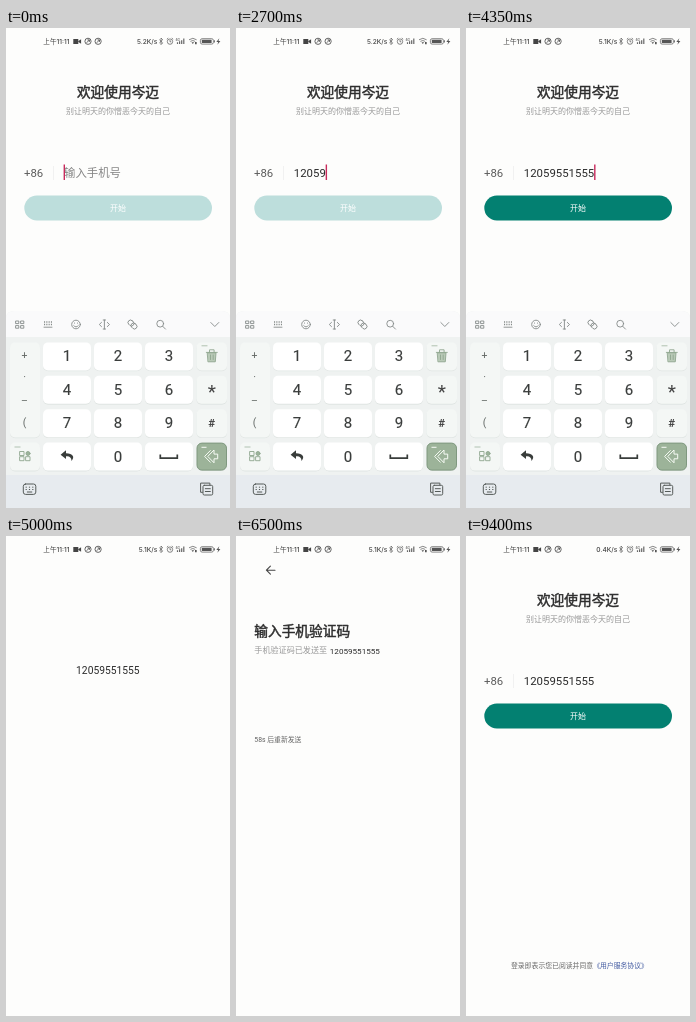
These frames come from a looping animation (224x480 px, 9.45 s). An HTML page:

```html
<!DOCTYPE html>
<html lang="zh-CN">
<head>
<meta charset="utf-8">
<title>登录</title>
<style>
  html, body { margin: 0; width: 100%; height: 100%; overflow: hidden; background: #fdfdfc; }
  svg { display: block; width: 100vw; height: 100vh; }
  text { font-family: Roboto, "Noto Sans CJK SC", "Noto Sans CJK", sans-serif; white-space: pre; }
  .mid { text-anchor: middle; }
  .status text { font: 500 6.6px Inter, "Noto Sans CJK SC", "Noto Sans CJK", sans-serif; fill: #444; }
  .head { font-size: 13.7px; fill: #2c2c2c; stroke: #2c2c2c; stroke-width: .45; }
  .note { font-size: 8px; fill: #999; }
  .small { font-size: 6.85px; fill: #666; }
  .field { font-size: 11.4px; }
  .digit { font-size: 15px; fill: #3a3d3c; stroke: #3a3d3c; stroke-width: .15; }
  .star { font-size: 19px; fill: #444; }
  .hash { font-size: 11.5px; font-weight: 700; fill: #444; }
  .sym { font-size: 10.5px; fill: #666c69; }
  .line { fill: none; stroke: #858b89; stroke-width: .9; stroke-linecap: round; stroke-linejoin: round; }
  .bar { stroke: #555b59; stroke-width: 1; }
  .green { stroke: #8fa68f; }
</style>
</head>
<body>
<svg viewBox="0 0 224 480">
  <rect width="224" height="480" fill="#fdfdfc"/>

  <g id="login">
    <text class="head mid" x="112" y="68.6">欢迎使用岑迈</text>
    <text class="note mid" x="112" y="86">别让明天的你憎恶今天的自己</text>
    <text class="field" x="18" y="149" fill="#5c5c5c">+86</text>
    <path d="M47.5 138v14" stroke="#eee" stroke-width=".8"/>
    <text id="hint" class="field" x="58" y="149.2" fill="#858585">输入手机号</text>
    <rect id="button" x="18.3" y="167.5" width="187.7" height="25" rx="12.5"/>
    <text class="mid" x="112" y="183.1" font-size="8" fill="#fff">开始</text>
    <text class="small" x="45" y="432">登录即表示您已阅读并同意<tspan fill="#4059a0">《用户服务协议》</tspan></text>
  </g>

  <g id="verify">
    <path class="line" style="stroke:#444;stroke-width:1.1" d="M39 34.2H30.6M34.4 30.2L30.4 34.2L34.4 38.2"/>
    <text class="head" x="18.3" y="100.2">输入手机验证码</text>
    <text class="note" x="18.3" y="117.4" style="font-size:8.1px">手机验证码已发送至</text>
    <text id="wait" class="small" x="18.3" y="206"></text>
  </g>

  <g id="number"><text id="digits" class="field" fill="#2a2a2a"></text></g>
  <rect id="caret" y="136.5" width="1.4" height="15.5" fill="#c92a5c"/>

  <g class="status">
    <text x="37.3" y="15.8">上午11:11</text>
    <path d="M67.3 11h5v5h-5zM72.5 13l2.6-1.7v4.4l-2.6-1.7z" fill="#444"/>
    <g fill="none" stroke="#555" stroke-width=".9">
      <circle cx="82" cy="13.3" r="3.1"/><path d="M80.6 14.8l2.8-2.9M81.4 11.9h2v2"/>
      <circle cx="92.1" cy="13.3" r="3.1"/><path d="M90.7 14.8l2.8-2.9M91.5 11.9h2v2"/>
      <g stroke-width=".7">
        <path d="M153.3 11.6l3.4 3.3l-1.7 1.7v-6.6l1.7 1.7l-3.4 3.3"/>
        <circle cx="164" cy="13.6" r="2.7"/><path d="M164 12v1.8h1.3M160.8 11.3l1.4-1.3M167.2 11.3l-1.4-1.3"/>
        <path d="M183 11.8q3.9-3 7.6 0M184.4 13.4q2.4-1.8 4.8 0"/>
        <rect x="194.4" y="10.7" width="13" height="5.4" rx="1.7"/>
      </g>
    </g>
    <path d="M185.5 14.2h2.6l-1.3 1.7zM189 14h1.7v2.2H189zM195.8 11.8h9.8v3.2h-9.8zM208 12.3h.8v2.2H208zM213.3 10.2l-3 3.7h1.9l-.8 2.8l3-3.8h-1.9z" fill="#555"/>
    <path d="M171.5 16v-1.7M173.6 16v-2.7M175.7 16v-3.7M177.8 16v-5.5" stroke="#666" stroke-width="1.2"/>
    <text x="169.4" y="12.6" style="font-size:3.2px">4G</text>
    <text id="speed" x="151.3" y="15.8" text-anchor="end"></text>
  </g>

  <g id="keyboard">
    <path d="M0 480V291q0-8 8-8h208q8 0 8 8v189z" fill="#eff2f1"/>
    <path d="M0 309V291q0-8 8-8h208q8 0 8 8v18z" fill="#fafafb"/>
    <path d="M0 447h224v33H0z" fill="#e7ebef"/>
    <g class="line">
      <path d="M10 293h2.8v2.6H10zM15 293h2.8v2.6H15zM10 297.6h2.8v2.6H10zM15 297.6h2.8v2.6H15z"/>
      <path d="M38 294h8M38 296.5h8" stroke-dasharray="1.1 1.2" stroke-linecap="butt" stroke-width="1.4"/>
      <path d="M38 299.2h8"/>
      <circle cx="70" cy="296.5" r="4.3"/>
      <path d="M67.7 297.6q2.3 2.8 4.6 0M68.5 295v.2M71.5 295v.2"/>
      <path d="M98.4 292v9M97.2 292h2.4M97.2 301h2.4M95.5 294.4l-2.2 2.1l2.2 2.1M101.3 294.4l2.2 2.1l-2.2 2.1"/>
      <g transform="rotate(45 126.5 296.5)">
        <rect x="121.2" y="294" width="6.4" height="5" rx="2.5"/>
        <rect x="125.4" y="294" width="6.4" height="5" rx="2.5"/>
      </g>
      <circle cx="154.2" cy="295.7" r="3.4"/><path d="M156.7 298.3l2.8 2.8"/>
      <path d="M204.8 294.5l4 4l4-4"/>
    </g>
    <g class="line bar">
      <rect x="17.3" y="456" width="12.5" height="10.4" rx="2.3"/>
      <path d="M20 459.2h.4M23.3 459.2h.4M26.6 459.2h.4M20 461.5h.4M23.3 461.5h.4M26.6 461.5h.4M21.3 464h4.5"/>
      <path d="M196.5 464.3h-1.9v-9.2h9.3v1.8"/>
      <rect x="197" y="457.3" width="9.7" height="9.7" rx="1.3"/><path d="M199.3 460.7h5M199.3 463.5h5"/>
    </g>
    <g id="keys"></g>
    <g id="side"></g>
    <g class="line green">
      <path d="M201.6 324.8h8.4l-.7 9h-7z" fill="#b9cab7"/>
      <path d="M200.3 324.4h11M203.5 324.2v-2.4h4.6v2.4M204.5 327v4.5M207.2 327v4.5"/>
      <path d="M14 423.5h4v4h-4zM14 428.7h4v4h-4zM20 428.7h4v4h-4z"/>
      <circle cx="22" cy="425.5" r="2" fill="#9db49c"/>
    </g>
    <path d="M195.5 317.8h6M8.5 419h6" stroke="#a9bbaa" stroke-width=".9"/>
    <path d="M60 422.3l-5.4 4.4l5.4 4.4v-2.8q5.2-.6 5.6 4.6q5-6.6-5.6-7.6z" fill="#393d3b"/>
    <path d="M154.3 426.5v3.6h17v-3.6" fill="none" stroke="#393d3b" stroke-width="1.7"/>
    <path d="M204.6 422.3l-6 6.1l6 6.1M208 422l-6.2 6.4l6.2 6.4v-4h3.7v-4.7H208zM195.5 419.3h5" fill="none" stroke="#f7fbf5" stroke-width="1" stroke-linejoin="round"/>
  </g>
</svg>

<script>
const $ = id => document.getElementById(id);
const LOOP = 9450;
const PHONE = '12059551555';
const TYPED = [700, 1050, 1600, 2200, 2550, 2950, 3100, 3400, 3950, 4050, 4150];
const LEAVE = 4840, BACK = 7000, FLY = 405;
const COLS = [37, 88, 139], ROWS = [314.4, 347.8, 381.2, 414.6];

const ramp = (t, a, b) => Math.min(1, Math.max(0, (t - a) / (b - a)));
const smooth = p => (1 - Math.cos(Math.PI * p)) / 2;
const out = p => 1 - (1 - p) ** 3;
const mix = (a, b, p) => a + (b - a) * p;

function key(x, y, w, h, fill, id = '', edge = 'none') {
  return `<rect x="${x}" y="${y + .9}" width="${w}" height="${h}" rx="5" fill="#e0e5e3"/>
    <rect id="${id}" x="${x}" y="${y}" width="${w}" height="${h}" rx="5" fill="${fill}" stroke="${edge}"/>`;
}

function label(text, x, y, style) {
  return `<text class="${style} mid" x="${x}" y="${y}">${text}</text>`;
}

function buildKeys() {
  let html = key(4, ROWS[0], 30, 95, '#f4f7f5') + key(4, ROWS[3], 30, 28, '#f4f7f5');
  ROWS.forEach((y, r) => {
    COLS.forEach((x, c) => {
      const name = r < 3 ? r * 3 + c + 1 : ['', 0, ''][c];
      html += key(x, y, 48, 28, '#fff', name === '' ? `f${c}` : `k${name}`);
      html += label(name, x + 24, y + 19, 'digit');
    });
    html += r < 3 ? key(190.5, y, 30.5, 28, '#f4f7f5') : key(191, y + .5, 29.5, 27, '#9cb399', '', '#7f987f');
  });
  html += label('*', 205.8, 370.2, 'star') + label('#', 205.8, 399.3, 'hash');
  $('keys').innerHTML = html;
}

const sideKeys = list => [...list].map((s, i) => label(s, 18.5, 330.5 + i * 22.6, 'sym')).join('');
const SIDES = [sideKeys('+·–('), sideKeys('·/+-')];
let side = -1;

function draw(t) {
  const count = TYPED.filter(k => k <= t).length;
  const last = count ? TYPED[count - 1] : 0;

  $('login').setAttribute('opacity', 1 - ramp(t, LEAVE - 10, LEAVE + 140) + ramp(t, BACK + 180, BACK + 400));
  $('verify').setAttribute('opacity', ramp(t, LEAVE + 200, LEAVE + 420) - ramp(t, BACK, BACK + 140));

  // The number flies between both pages.
  const fly = smooth(ramp(t, LEAVE, LEAVE + FLY)) - smooth(ramp(t, BACK, BACK + FLY));
  const scale = mix(1, 8.1 / 11.4, fly);
  $('number').setAttribute('transform', `translate(${mix(57.8, 93.8, fly)} ${mix(149, 117.5, fly)}) scale(${scale})`);
  $('digits').textContent = PHONE.slice(0, count);
  $('hint').setAttribute('opacity', count ? 0 : 1);

  const caretOn = t < LEAVE && (t - last) % 1000 < 500;
  $('caret').setAttribute('opacity', caretOn ? 1 : 0);
  $('caret').setAttribute('x', 57.6 + count * 6.41);

  const ready = ramp(t, 4150, 4340);
  const teal = [[189, 3], [222, 128], [220, 113]].map(([a, b]) => Math.round(mix(a, b, ready)));
  $('button').setAttribute('fill', `rgb(${teal})`);

  $('speed').textContent = (t < 2900 ? '5.2' : t < 6800 ? '5.1' : '0.4') + 'K/s';
  $('wait').textContent = (t < 5750 ? 59 : t < 6800 ? 58 : 57) + 's 后重新发送';

  const hidden = smooth(ramp(t, 4860, 5000)) - out(ramp(t, 5150, 5490)) + smooth(ramp(t, 6000, 6350));
  $('keyboard').setAttribute('transform', `translate(0 ${hidden * 200})`);
  for (let d = 0; d < 10; d++) {
    const down = count && t - last < 90 && +PHONE[count - 1] === d;
    $('k' + d).setAttribute('fill', down ? '#e8edea' : '#fff');
  }
  const next = t < 5050 ? 0 : 1;
  if (next !== side) $('side').innerHTML = SIDES[side = next];
}

buildKeys();
const start = performance.now();
function tick() {
  draw((performance.now() - start) % LOOP);
  requestAnimationFrame(tick);
}
tick();
</script>
</body>
</html>
```
